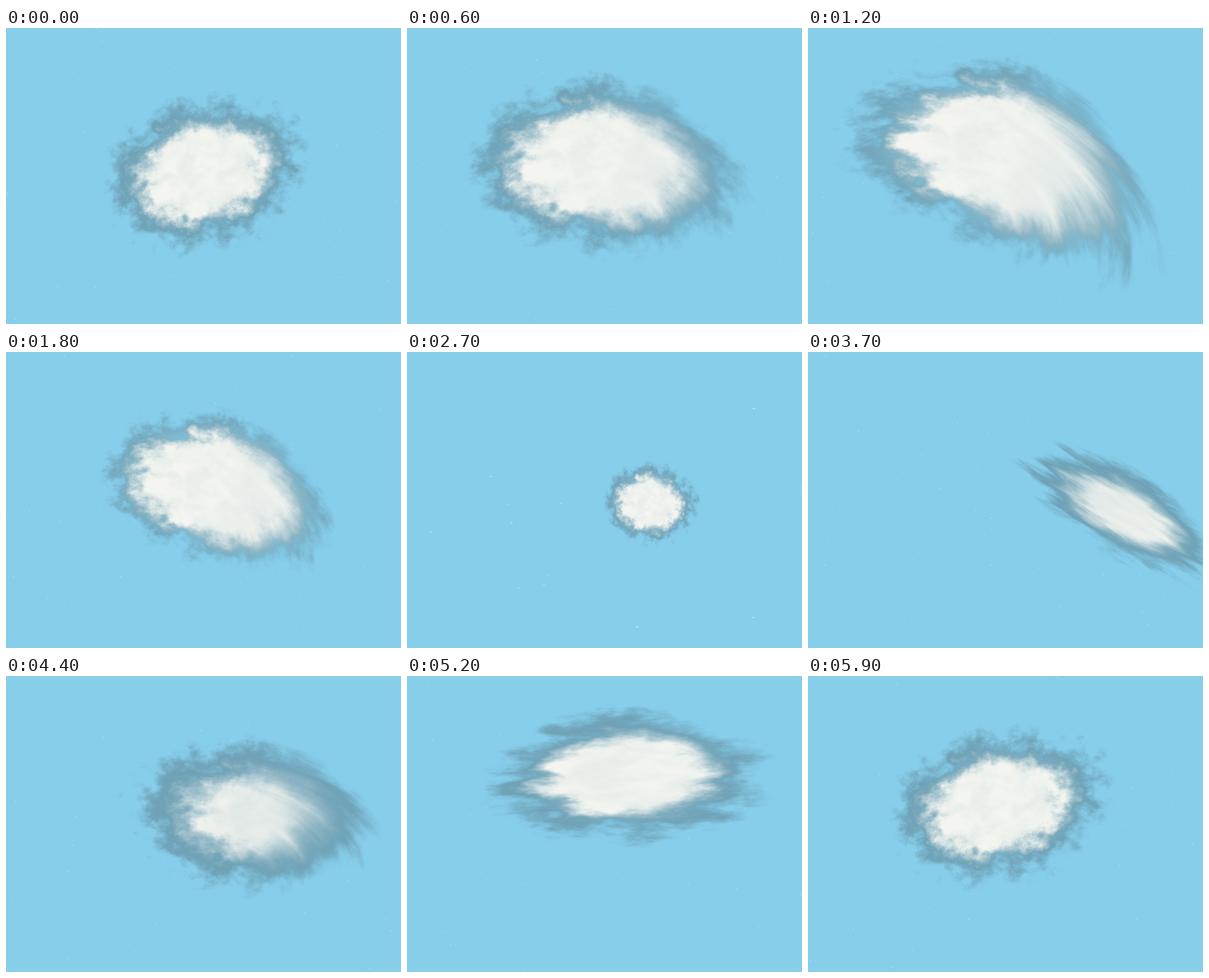
An HTML page with a canvas that plays this animation: 512x384 px, repeating every 6 s.

```html
<!DOCTYPE html>
<html lang="en">
<head>
<meta charset="utf-8">
<title>Drifting cloud</title>
<style>
  html, body { margin: 0; width: 100%; height: 100%; overflow: hidden; background: #87ceeb; }
  canvas { display: block; }
</style>
</head>
<body>
<canvas id="stage" width="512" height="384"></canvas>
<script>
const W = 512, H = 384, LOOP = 6000, STEP = 100;
const ctx = document.getElementById('stage').getContext('2d');
const layer = document.createElement('canvas');
layer.width = W;
layer.height = H;
const layerCtx = layer.getContext('2d');
const image = layerCtx.createImageData(W, H);
const px = image.data;

// Key points of the flight: the ellipse that holds the cloud.
const keys = [
  { t: 0,    x: 256, y: 187, a: 116, b: 86,  angle: -0.30 },
  { t: 1200, x: 260, y: 168, a: 180, b: 104, angle: 0.40 },
  { t: 2700, x: 314, y: 196, a: 53,  b: 46,  angle: 0.10 },
  { t: 3700, x: 408, y: 208, a: 122, b: 48,  angle: 0.52 },
  { t: 4400, x: 318, y: 181, a: 138, b: 86,  angle: 0.08 },
  { t: 5200, x: 287, y: 130, a: 160, b: 76,  angle: -0.04 },
  { t: 5900, x: 246, y: 168, a: 125, b: 86,  angle: -0.24 }
];

let seed = 7;
const random = () => (seed = (Math.imul(seed, 1664525) + 1013904223) >>> 0) / 4294967296;
const lattice = Float32Array.from({ length: 65536 }, random);
const stars = Array.from({ length: 60 }, () => ({
  x: random() * W, y: random() * H, pink: random() < 0.2, alpha: 0.5 + random() * 0.5
}));

const clamp = x => x < 0 ? 0 : x > 1 ? 1 : x;
function smooth(a, b, x) {
  const t = clamp((x - a) / (b - a));
  return t * t * (3 - 2 * t);
}

// Bell that rises to 1 at a moment of the loop.
function pulse(t, peak, width) {
  const gap = Math.abs(t - peak);
  return Math.exp(-((Math.min(gap, LOOP - gap) / width) ** 2));
}

function noise(x, y) {
  const ix = Math.floor(x), iy = Math.floor(y);
  let fx = x - ix, fy = y - iy;
  fx *= fx * (3 - 2 * fx);
  fy *= fy * (3 - 2 * fy);
  const x0 = ix & 255, x1 = (ix + 1) & 255;
  const y0 = (iy & 255) << 8, y1 = ((iy + 1) & 255) << 8;
  const a = lattice[y0 | x0], b = lattice[y1 | x0];
  const top = a + (lattice[y0 | x1] - a) * fx;
  return top + (b + (lattice[y1 | x1] - b) * fx - top) * fy;
}

// Centred on zero; each octave turns slightly to hide the lattice.
function fbm(x, y) {
  let sum = 0, gain = 0.46;
  for (let i = 0; i < 5; i++) {
    sum += gain * (noise(x, y) - 0.5);
    const nx = 1.9 * x - 0.7 * y + 17.3;
    y = 0.7 * x + 1.9 * y + 9.1;
    x = nx;
    gain *= 0.6;
  }
  return sum;
}

function keyAt(i) {
  const n = keys.length, turn = Math.floor(i / n), key = keys[i - turn * n];
  return { ...key, t: key.t + turn * LOOP };
}

// Periodic cubic through the key points.
function poseAt(t) {
  const i = keys.findLastIndex(key => key.t <= t);
  const [p, a, b, q] = [i - 1, i, i + 1, i + 2].map(keyAt);
  const span = b.t - a.t, s = (t - a.t) / span, r = 1 - s;
  const pose = {};
  for (const k of ['x', 'y', 'a', 'b', 'angle']) {
    const va = (b[k] - p[k]) / (b.t - p.t) * span;
    const vb = (q[k] - a[k]) / (q.t - a.t) * span;
    pose[k] = a[k] * (1 + 2 * s) * r * r + va * s * r * r + b[k] * s * s * (3 - 2 * s) - vb * s * s * r;
  }
  return pose;
}

function drawStars(t) {
  const phase = t / LOOP, far = pulse(t, 2700, 500);
  stars.slice(0, Math.round(60 - 44 * far)).forEach(star => {
    const x = (star.x + phase * W) % W;
    const y = (star.y + 70 * Math.sin(phase * 2 * Math.PI) + H) % H;
    ctx.globalAlpha = star.alpha;
    ctx.fillStyle = star.pink ? '#d8c6d0' : '#cfeaf4';
    ctx.fillRect(Math.floor(x), Math.floor(y), far > 0.5 ? 3 : 1, 1);
  });
  ctx.globalAlpha = 1;
}

function drawCloud(t) {
  const { x: cx, y: cy, a, b, angle } = poseAt(t);
  const haze = pulse(t, 4100, 800);
  const swirl = clamp(pulse(t, 1200, 800) + 0.8 * pulse(t, 4500, 500));
  const bend = 0.3 * pulse(t, 1200, 900);
  const streak = Math.max(1, 2 * a / b - 2.2);
  const edge = 0.29 + 0.13 * haze - 0.1 * pulse(t, 1800, 1200);
  const white = 0.96 - 0.08 * haze;

  const cos = Math.cos(angle), sin = Math.sin(angle);
  const reach = 1.5 * Math.max(a, b);
  const left = Math.max(0, Math.floor(cx - reach)), right = Math.min(W, cx + reach);
  const top = Math.max(0, Math.floor(cy - reach)), bottom = Math.min(H, cy + reach);
  const turn = t / LOOP * 2 * Math.PI;
  const driftX = 40 + 0.4 * Math.sin(turn), driftY = 60 + 0.4 * Math.cos(turn);
  px.fill(0);

  for (let y = top; y < bottom; y++) {
    for (let x = left; x < right; x++) {
      const dx = x - cx, dy = y - cy;
      const u = (dx * cos + dy * sin) / a;
      const v0 = (dy * cos - dx * sin) / b;
      const v = v0 - bend * u * u;
      const r = Math.hypot(u, v);
      if (r > 1.4) continue;

      let n = fbm(u * 6 / streak + driftX, v * 5 + driftY);
      const arc = swirl * smooth(-0.3, 0.5, u);
      if (arc > 0.01) {
        const pu = u + 0.4, pv = v0 - 1;
        const swept = fbm(Math.hypot(pu, pv) * 6 + 80, Math.atan2(pv, pu) * 1.5 + 30);
        n += (swept - n) * arc;
      }

      const depth = 1 - r;
      const alpha = smooth(-0.17, 0.2, depth + n * 0.75);
      if (alpha < 0.01) continue;
      const soft = 0.15 + 0.08 * haze + 0.13 * arc;
      const c = smooth(edge - soft, edge + soft, depth + n * 0.45 - 0.04 * arc);
      const light = clamp(c * (white + n * 0.22 - 0.06 * arc));
      const i = (y * W + x) * 4;
      px[i] = 110 + 134 * light;
      px[i + 1] = 159 + 86 * light;
      px[i + 2] = 179 + 61 * light;
      px[i + 3] = 240 * alpha + 15 * c;
    }
  }
  layerCtx.putImageData(image, 0, 0);
  ctx.drawImage(layer, 0, 0);
}

let shown = -1;
const start = performance.now();
function tick() {
  const step = Math.floor((performance.now() - start) % LOOP / STEP);
  if (step !== shown) {
    shown = step;
    ctx.fillStyle = '#87ceeb';
    ctx.fillRect(0, 0, W, H);
    drawStars(step * STEP);
    drawCloud(step * STEP);
  }
  requestAnimationFrame(tick);
}
tick();
</script>
</body>
</html>
```
